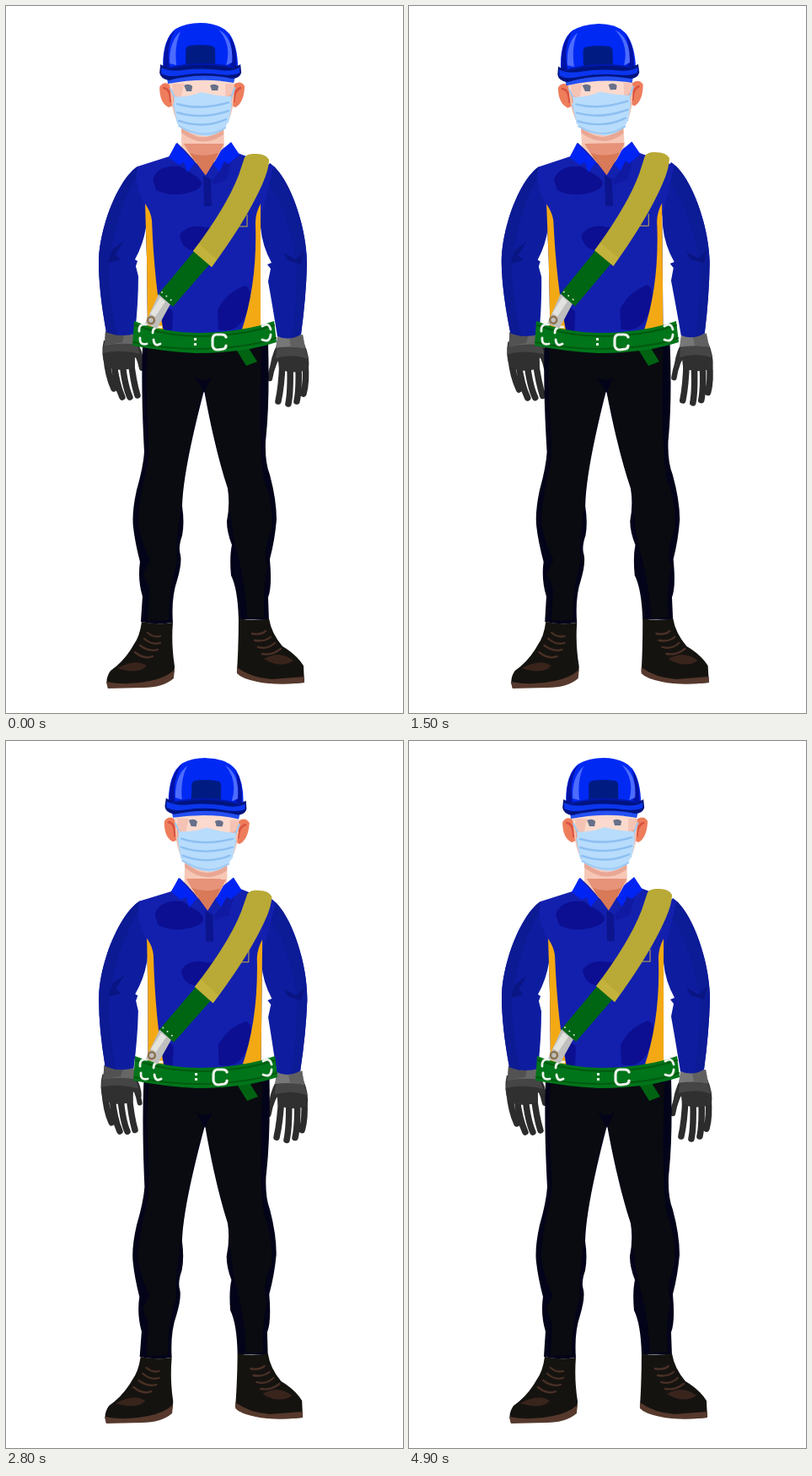
An HTML page for the animation above (5 s loop, 471 px wide and 837 px high).

```html
<!DOCTYPE html>
<html lang="en">
<head>
<meta charset="utf-8">
<title>Worker</title>
<style>
html, body { margin: 0; width: 100%; height: 100%; overflow: hidden; background: #fff; }
svg { display: block; width: 100%; height: 100%; }
.line { fill: none; stroke-linecap: round; stroke-linejoin: round; }
</style>
</head>
<body>
<svg viewBox="0 0 471 837">
  <g id="armL">
    <g class="line" stroke="#2c2c2c" stroke-width="7.5">
      <path d="M119 415Q121 438 128 453M128 422Q131 448 138 463M138 422Q141 450 147 463M148 418Q151 445 156 461"/>
      <path d="M150 404Q158 413 161 429" stroke-width="6"/>
    </g>
    <path d="M116 396L154 396Q163 408 163 422L153 416L153 428Q134 434 118 427Q112 412 116 396Z" fill="#303030"/>
    <path d="M116 400Q134 396 156 402L159 412Q135 406 115 411Z" fill="#454545"/>
    <path d="M118 385Q136 390 153 387L155 401Q137 398 117 402Z" fill="#666"/>
    <path d="M118 385L140 389L138 398L117 402Z" fill="#525252"/>
    <path d="M156 190C132 206 110 265 110 303Q110 338 119 386Q136 393 153 388Q157 352 157 320L154 308L156 302L153 300Q163 282 166 262L172 200Z" fill="#0e1d9f"/>
    <path d="M156 190C132 206 110 265 110 303Q110 338 119 386L132 390Q122 350 122 305Q132 235 160 193Z" fill="#0c1a93"/>
    <path d="M121 304L126 288L140 278L130 294L136 300Z" fill="#0a1584"/>
  </g>
  <g id="armR">
    <g class="line" stroke="#2c2c2c" stroke-width="7.5">
      <path d="M328 422Q327 450 323 468M337 425Q338 456 335 471M347 425Q348 454 345 468M355 422Q357 445 353 459"/>
      <path d="M327 406Q316 422 313 441" stroke-width="6.5"/>
    </g>
    <path d="M322 400L354 400Q361 416 359 430Q342 437 324 430L323 420L313 434Q313 417 322 400Z" fill="#303030"/>
    <path d="M321 406Q337 400 355 405L359 418Q340 411 320 417Z" fill="#454545"/>
    <path d="M322 391Q336 394 352 389L355 405Q338 402 320 405Z" fill="#777"/>
    <path d="M336 393L352 389L355 405L338 403Z" fill="#606060"/>
    <path d="M313 186C338 203 357 265 357 306Q356 345 350 389Q336 397 322 391Q316 354 311 326L314 311L310 306L315 304Q304 284 302 262L300 200Z" fill="#0e1d9f"/>
    <path d="M318 190C340 212 357 265 357 306Q356 345 350 389L339 393Q346 344 345 306Q335 240 308 205Z" fill="#0c1b96"/>
    <path d="M329 292L344 300L354 290L350 306L334 301Z" fill="#0a1584"/>
  </g>
  <g id="legs">
    <path d="M162 400Q160 455 164 528Q163 545 155 573Q149 600 151 617Q153 635 159 658Q156 679 162 699L160 729Q178 733 198 730Q196 700 203 680Q209 660 207 650Q204 641 209 627Q212 612 209 592Q210 550 235 455Q248 526 263 571Q266 590 262 610Q262 623 268 638Q265 652 267 674Q275 690 276 726L312 727L311 700Q316 688 313 655Q319 632 321 608Q321 585 313 555Q307 540 308 515Q313 470 311 400Z" fill="#03031a"/>
    <path d="M168 405C163 460 172 510 168 542Q156 590 157 614Q162 640 171 656L163 672L170 690L168 728L193 727Q193 690 203 658Q201 640 206 605Q212 535 235 448Q248 525 265 575Q266 620 275 650Q285 690 286 724L307 724Q304 690 311 663Q303 650 315 620Q318 590 306 560Q299 520 303 405Z" fill="#0a0b10"/>
    <path d="M224 439Q234 447 244 439L235 458Z" fill="#03031a"/>
    <path d="M161 729Q180 733 198 730Q196 756 200 781Q201 793 191 798Q177 806 160 806L121 807Q117 797 124 787Q141 775 151 757Q159 746 161 729Z" fill="#151310"/>
    <path d="M119 800Q145 805 171 799Q188 796 200 786L199 796Q186 807 163 807L121 808Z" fill="#56392c"/>
    <path d="M132 784Q154 772 167 781Q158 792 132 784Z" fill="#39241c"/>
    <path d="M276 725Q294 729 312 725Q315 743 328 758Q345 768 353 781L354 801Q326 804 301 800Q282 796 274 788Q276 758 276 725Z" fill="#151310"/>
    <path d="M274 783Q290 795 315 797L354 794L354 801Q321 805 298 800Q279 796 274 790Z" fill="#56392c"/>
    <path d="M306 773Q325 762 341 775Q326 785 306 773Z" fill="#39241c"/>
    <path class="line" stroke="#4a3026" stroke-width="2.3" d="M168 742Q175 748 183 746M164 749Q173 757 183 754M159 757Q170 765 180 762M153 765Q164 774 174 770M292 743Q302 745 308 740M295 751Q307 753 314 747M299 759Q311 762 319 754M304 767Q316 769 326 761"/>
  </g>
  <g id="torso">
    <path d="M200 176L156 190C150 213 164 230 165 240L167 300L168 390L302 390L302 250Q312 215 317 190L272 173L236 190Z" fill="#1320ae"/>
    <g fill="#0c0f91">
      <path d="M174 205Q181 187 207 190L226 202Q239 212 223 219Q198 228 178 218Z"/>
      <path d="M206 271Q216 257 236 262L247 262L227 290Q208 289 206 271Z"/>
      <path d="M251 360Q260 340 283 331Q295 335 286 362Q276 389 252 383Z"/>
      <path d="M185 362Q190 352 198 362L197 386L186 386Z"/>
    </g>
    <path d="M244 186L268 182L262 206L245 212Z" fill="#1019a2"/>
    <path d="M234 198L243 206L244 237L235 237Z" fill="#0c158d"/>
    <path d="M165 234Q172 244 173 254Q176 330 187 386L168 386L167 300Z" fill="#f3a913"/>
    <path d="M302 234Q295 247 296 260Q298 330 279 386L302 386Z" fill="#f3a913"/>
    <path d="M276 261L286 261L286 247" class="line" stroke="#c9ad42"/>
  </g>
  <g id="head">
    <path d="M208 135L258 135L259 174L236 192L208 174Z" fill="#f7c7b6"/>
    <path d="M208 142Q234 169 258 142L258 152Q234 170 208 150Z" fill="#e9a794"/>
    <g fill="#ee7d5c">
      <path d="M198 95Q187 87 182 96Q182 115 193 120L200 117Z"/>
      <path d="M267 95Q278 86 283 95Q282 115 272 120L266 117Z"/>
    </g>
    <path d="M187 97Q195 98 195 113M278 97Q271 99 270 113" class="line" stroke="#d95240" stroke-width="2.5"/>
    <path d="M195 82L270 82Q273 125 260 142Q235 164 207 143Q193 125 195 82Z" fill="#f8c1ab"/>
    <path d="M197 92L211 92L206 116L198 114ZM260 92L270 92L267 115L260 108Z" fill="#ee9b82"/>
    <path d="M190 86Q233 82 272 86L268 104Q254 114 240 106L234 100L226 107Q211 113 198 105Z" fill="#fff" opacity=".4"/>
    <path d="M224 89L236 89L238 103L226 105Z" fill="#fbd9ce"/>
    <path d="M211 94Q217 91 221 95L220 101L214 101ZM242 94Q248 91 252 95L251 100L244 100Z" fill="#66708a"/>
    <path d="M195 98L202 112M271 97L266 111M204 139L199 116M263 137L267 116" class="line" stroke="#9ecaf3" stroke-width="2"/>
    <path d="M199 107Q214 109 232 102Q251 107 267 107Q269 128 260 144Q249 154 236 154Q216 152 205 142Q199 127 199 107Z" fill="#b8dcfc"/>
    <path d="M203 116Q230 124 264 114M203 126Q232 135 264 124M205 136Q234 146 261 134" class="line" stroke="#8dbff1" stroke-width="2.4"/>
    <path d="M205 142Q235 160 260 144" class="line" stroke="#9dc9f3" stroke-width="2"/>
    <g id="helmet">
      <path d="M190 82Q232 79 272 82L270 91Q234 84 192 92Z" fill="#2450f2"/>
      <path d="M186 75Q185 39 201 27Q214 20 230 20Q254 20 265 33Q275 48 275 75Z" fill="#0029f4"/>
      <path d="M187 73Q185 42 201 28Q189 46 194 73ZM273 71Q274 45 264 34Q270 50 265 74Z" fill="#0013a5"/>
      <path d="M194 68Q193 42 207 30Q199 47 202 70ZM252 28Q270 38 268 67L261 70Q268 46 252 28Z" fill="#4d6cff"/>
      <path d="M217 47Q231 45 244 47Q248 48 248 53L248 73L213 73L213 53Q213 48 217 47Z" fill="#001c83"/>
      <path d="M183 69Q190 74 203 72Q231 66 260 71Q272 73 278 69L279 79Q277 86 268 86Q231 78 193 88Q183 86 182 79Z" fill="#00147f"/>
      <path d="M184 73Q194 78 209 76Q232 73 255 76Q267 78 277 73L277 79Q269 83 253 81Q231 78 208 82Q193 85 184 80Z" fill="#0b36ef"/>
      <path d="M191 74Q231 64 270 73" class="line" stroke="#0018ad" stroke-width="2"/>
    </g>
  </g>
  <g id="collar">
    <path d="M211 163L258 163L249 181L237 201L222 181Z" fill="#d87958"/>
    <path d="M211 163L258 163L252 174Q233 180 218 174Z" fill="#e69379"/>
    <path d="M203 162L193 179L205 188L211 184L216 195L237 202Q222 179 203 162Z" fill="#1321af"/>
    <path d="M202 162L193 179L205 188L211 185L215 197L224 186Z" fill="#0024f3"/>
    <path d="M258 168L236 202L246 205L254 194Z" fill="#1321af"/>
    <path d="M267 161L277 176L264 187L259 184L253 196L246 188L255 171Z" fill="#0024f3"/>
  </g>
  <g id="belt">
    <path d="M272 405L286 402L298 421L285 426Z" fill="#006312"/>
    <path d="M152 373Q188 387 231 387Q282 386 318 373L321 398Q283 411 225 411Q187 409 150 402Z" fill="#00751a"/>
    <path d="M153 378Q190 391 232 391Q282 390 318 378M151 398Q190 406 228 406Q287 405 320 393" class="line" stroke="#005b10" stroke-width="2"/>
    <g class="line" stroke="#edf3ec" stroke-width="2.8">
      <path d="M166 377Q157 376 158 385M159 393Q158 402 167 400M184 380Q174 379 174 387M175 395Q176 404 183 400M304 379Q312 374 314 383M304 395Q313 399 314 389"/>
      <path d="M261 392Q260 389 256 389L249 389Q245 390 245 395L245 402Q246 407 251 407L258 406Q261 405 261 402" stroke-width="3.2"/>
    </g>
    <path d="M223 393h3v3h-3zM223 399h3v3h-3z" fill="#e9f5e6"/>
  </g>
  <g id="strap">
    <path d="M181 341L195 353L179 382L165 376Z" fill="#bfbfbd"/>
    <path d="M183 345L189 350L177 368L171 364Z" fill="#e2e2df"/>
    <circle cx="172" cy="372" r="4" class="line" stroke="#8c7350" stroke-width="2.5"/>
    <path d="M225 288L243 304L198 356L181 341Z" fill="#006614"/>
    <path d="M185 339L198 350" class="line" stroke="#d9e4d6" stroke-width="2" stroke-dasharray="0 7"/>
    <path d="M283 179Q287 174 297 175Q308 175 312 182Q312 193 304 211Q286 252 244 309L222 290Q262 237 276 200Z" fill="#b9a936"/>
    <path d="M222 290L229 281L250 300L244 309Z" fill="#c3b23b"/>
  </g>
</svg>
<script>
const $ = id => document.getElementById(id);
const move = (id, x, y, turn = 0, cx = 0, cy = 0) =>
  $(id).setAttribute('transform', `translate(${x} ${y}) rotate(${turn} ${cx} ${cy})`);

// q is the sway: 0 upright, negative to the left, positive to the right
function pose(q) {
  const shear = -0.032 * q;
  $('legs').setAttribute('transform', `matrix(1 0 ${shear} 1 ${-575 * shear} 0)`);
  move('armL', 0, -4 * q, 4.3 * q, 130, 315);
  move('armR', 0, 5 * q, 3 * q, 335, 330);
  move('torso', 2 * q, q, 2.2 * q, 235, 385);
  move('collar', 2 * q, q, 2.2 * q, 235, 385);
  move('belt', 4 * q, 0);
  move('strap', 3 * q, 2 * q, 2.8 * q, 190, 375);
  move('head', 13 * q, 2 * q, 7 * q, 232, 165);
  move('helmet', 0, 9 * q * q - 4 * q);
}

function draw(now) {
  // 25 steps out, then the same 25 back
  const i = Math.floor(now % 5000 / 100);
  const t = Math.min(i, 49 - i) * 100;
  pose((1 - Math.cos((t - 900) * 0.00163)) * 0.555 - 0.49);
  requestAnimationFrame(draw);
}
draw(0);
</script>
</body>
</html>
```
